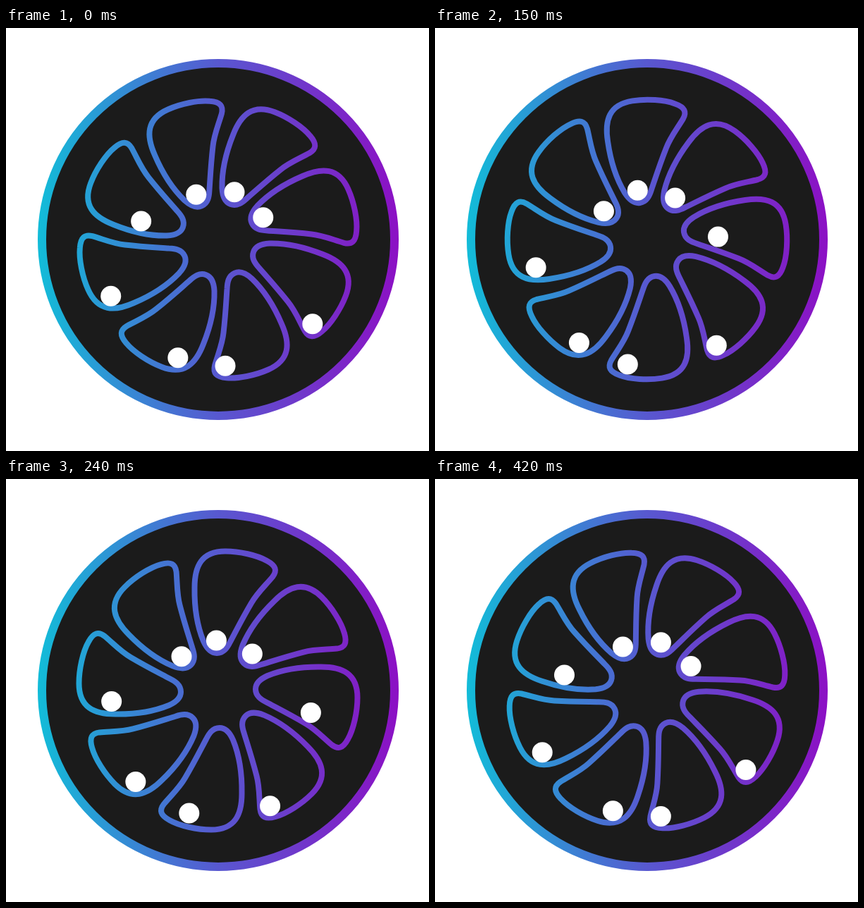
Animation of 600x600 px, one loop 450 ms. Source, as an HTML page with a canvas:

```html
<!DOCTYPE html>
<html lang="en">
<head>
<meta charset="utf-8">
<title>Ball wheel</title>
<style>
  html, body { margin: 0; width: 100%; height: 100%; overflow: hidden; background: #fff; }
  canvas { display: block; }
</style>
</head>
<body>
<canvas id="stage" width="600" height="600"></canvas>
<script>
const ctx = document.getElementById('stage').getContext('2d');
const CX = 301, CY = 300, CHAMBERS = 8, LOOP = 450, STEP = 30;

// One chamber, relative to the hub, pointing up
const chamber = new Path2D(`M-2-53 C-11-53-17-61-21-70 C-30-92-34-115-33.5-146
  C-33.5-176-24-197.5 10-197.5 C30-197.5 55-192 69-184 C82-177 84-170 77-161
  C66-148 55-138 47-124 C34-102 25-84 17-69 C13-61 8-53-2-53Z`);

// Resting places of a ball, measured from its chamber's axis
const cup = { angle: -2.1, radius: 71 };
const tip = { angle: 20.8, radius: 179.5 };
const corner = { angle: -2.1, radius: 177.5 };
const shoulder = { angle: -3.3, radius: 173 };
const slope = { angle: -7.6, radius: 115 };

// Rolling legs of one full turn; between them the ball rides with the wheel
const legs = [
  { start: 900, end: 1230, from: cup, to: tip, turn: 1.2, roll: 1.65 },
  { start: 1800, end: 2220, from: tip, to: corner, turn: 2, roll: 2 },
  { start: 2220, end: 2640, from: corner, to: shoulder, turn: 1, roll: 1 },
  { start: 2640, end: 3140, from: shoulder, to: slope, turn: 1, roll: 2 },
  { start: 3140, end: 3310, from: slope, to: cup, turn: 2.2, roll: 1 }
];

const gradient = ctx.createLinearGradient(45, 0, 557, 0);
gradient.addColorStop(0, '#12bcd8');
gradient.addColorStop(.5, '#5858d0');
gradient.addColorStop(1, '#8c10c4');

const chamberAngle = time => time / 10 - 24;
const mix = (a, b, u) => a + (b - a) * u;

function circle(x, y, radius) {
  ctx.beginPath();
  ctx.arc(x, y, radius, 0, Math.PI * 2);
}

function ballPlace(time) {
  const leg = legs.findLast(leg => leg.start <= time);
  if (!leg) return cup;
  const { start, end, from, to, turn, roll } = leg;
  const u = Math.min(1, (time - start) / (end - start));
  return {
    angle: mix(from.angle, to.angle, u ** turn),
    radius: mix(from.radius, to.radius, u ** roll)
  };
}

function drawChamber(time) {
  const path = new Path2D();
  path.addPath(chamber, new DOMMatrix().translate(CX, CY).rotate(chamberAngle(time)));
  ctx.stroke(path);
}

function drawBall(time) {
  const { angle, radius } = ballPlace(time);
  const a = (chamberAngle(time) + angle) * Math.PI / 180;
  circle(CX + radius * Math.sin(a), CY - radius * Math.cos(a), 14.5);
  ctx.fill();
}

function draw(now) {
  const time = Math.floor(now % LOOP / STEP) * STEP;
  const phases = Array.from({ length: CHAMBERS }, (_, k) => time + k * LOOP);

  ctx.fillStyle = '#fff';
  ctx.fillRect(0, 0, 600, 600);

  circle(CX, CY, 250);
  ctx.fillStyle = '#1b1b1b';
  ctx.fill();
  ctx.strokeStyle = gradient;
  ctx.lineWidth = 12;
  ctx.stroke();

  ctx.lineWidth = 8;
  phases.forEach(drawChamber);
  ctx.fillStyle = '#fff';
  phases.forEach(drawBall);
}

const start = performance.now();
function tick() {
  draw(performance.now() - start);
  requestAnimationFrame(tick);
}
tick();
</script>
</body>
</html>
```
